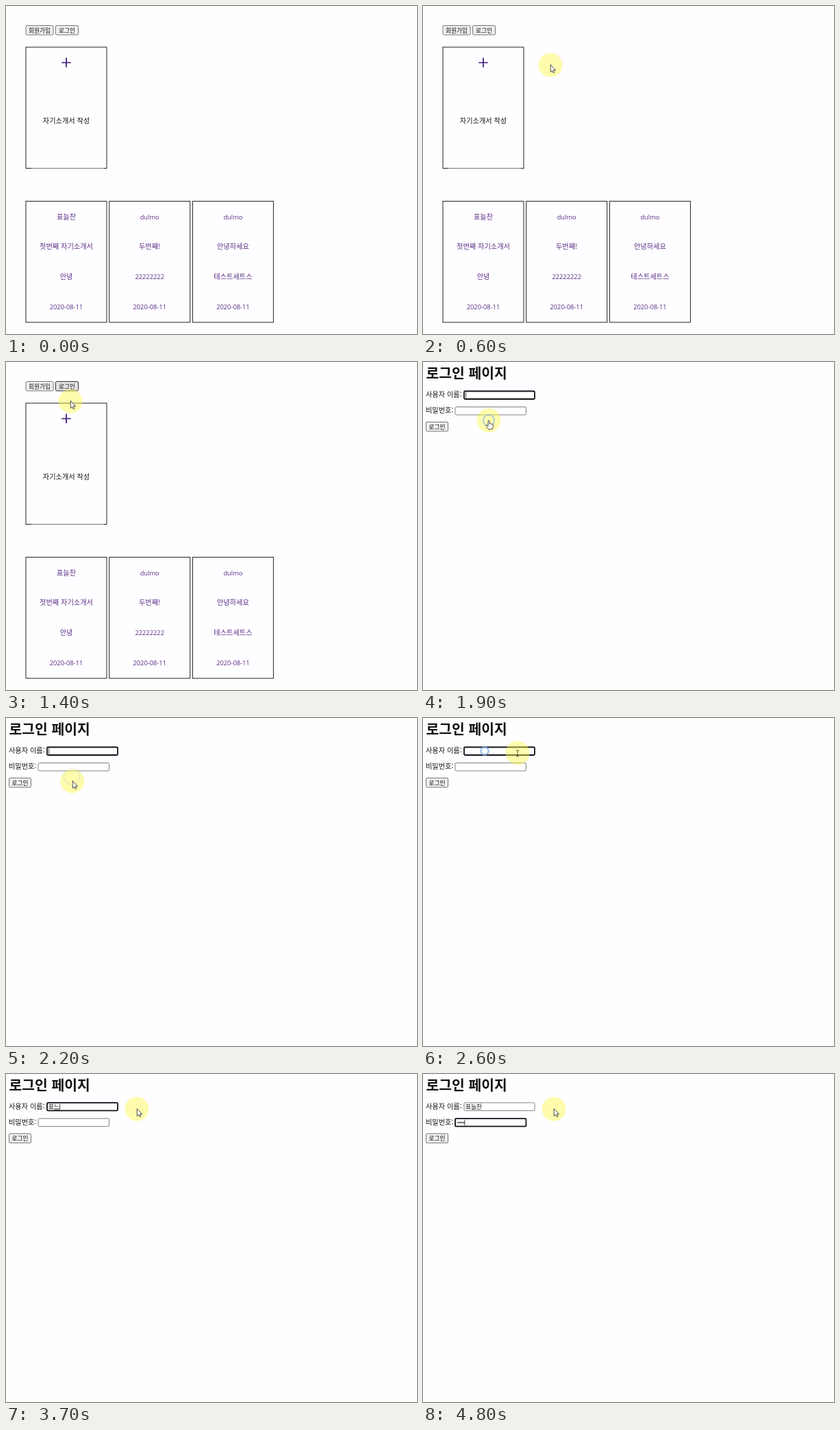
Recreate the animation shown at these times as an HTML page. Size 600 by 478 pixels, loop 5000 ms.

```html
<!DOCTYPE html>
<html lang="ko">
<meta charset="utf-8">
<title>로그인</title>
<style>
  html, body { margin: 0; width: 100%; height: 100%; overflow: hidden; background: #fefdff; }
  svg { display: block; }
  text { font: 10.2px "Noto Sans CJK KR", "Noto Sans CJK", sans-serif; fill: #111; }
  .mid { text-anchor: middle; }
  .link { fill: #5a2d85; }
  .latin { font: 9.3px "Open Sans", "Noto Sans", sans-serif; }
  .small { font-size: 8.7px; }
  h1, .title { font-size: 20.4px; font-weight: bold; }
  .card { fill: none; stroke: #222; }
  .button { fill: #efefef; stroke: #777; }
  .hover { fill: #e3e3e3; stroke: #333; }
  .field { fill: #fff; stroke: #808080; }
  .focus { stroke: #101018; stroke-width: 1.8; }
  .ink { stroke: #111; fill: none; }
</style>
<svg width="600" height="478" viewBox="0 0 600 478">
  <g id="home"></g>
  <g id="login">
    <text class="title" x="4.5" y="24">로그인 페이지</text>
    <g id="form">
      <text x="4" y="51.4">사용자 이름:</text>
      <text x="4" y="74.2">비밀번호:</text>
      <rect id="user" class="field" x="60" y="42.5" width="103" height="11.5" rx="1.5"/>
      <rect id="pass" class="field" x="47" y="65.5" width="103.5" height="11.5" rx="1.5"/>
      <text id="typed" class="small" x="62" y="51.6"></text>
      <path id="underline" class="ink" stroke-width=".8"/>
      <g id="dots"></g>
      <path id="caret" class="ink" stroke-width=".8"/>
    </g>
  </g>
  <g id="pointer">
    <circle r="17.5" fill="#fcf84a" opacity=".45"/>
  </g>
  <circle id="ring" fill="none" stroke="#82ade6" stroke-width="2.4"/>
  <g id="shapes" stroke="#222" stroke-width=".8" stroke-linejoin="round" fill="#fff">
    <path id="arrow" d="M.3-.5V10.3L2.7 8.1 4.2 11.5 5.8 10.8 4.4 7.6H7.5Z"/>
    <path id="hand" d="M-1 1Q0-1 1 1V5Q2.2 4 3 5.4 4.3 4.6 4.8 6 6.3 5.6 6.3 7.2V9.5L5 13H-.3L-3.8 8.2Q-4 6.5-2.5 7L-1 8.5Z"/>
    <path id="beam" fill="none" d="M-2-4Q0-4 0-3 0-4 2-4M0-3V4M-2 5Q0 5 0 4 0 5 2 5"/>
  </g>
</svg>
<script>
  const $ = id => document.getElementById(id);
  const show = (id, on) => $(id).style.display = on ? "" : "none";

  function add(parent, tag, attrs, label = "") {
    const el = document.createElementNS("http://www.w3.org/2000/svg", tag);
    for (const key in attrs) el.setAttribute(key, attrs[key]);
    el.textContent = label;
    return parent.appendChild(el);
  }

  function button(parent, x, y, width, label) {
    const box = add(parent, "rect", { class: "button", x, y, width, height: 13.5, rx: 1.5 });
    add(parent, "text", { class: "small mid", x: x + width / 2, y: y + 10.1 }, label);
    return box;
  }

  const card = (x, y) => add($("home"), "rect", { class: "card", x, y, width: 118, height: 176.5 });

  // Start page
  const home = $("home");
  button(home, 29, 28.5, 40, "회원가입");
  const loginButton = button(home, 72.5, 28.5, 33, "로그인");
  card(29, 60);
  add(home, "path", { d: "M37 236.5H143", stroke: "#777" });
  add(home, "path", { d: "M81.2 82.5H94.8M88 75.5V89.3", stroke: "#3a1878", "stroke-width": 1.7 });
  add(home, "text", { class: "mid", x: 88, y: 171.2 }, "자기소개서 작성");
  [
    ["표늘찬", "첫번째 자기소개서", "안녕"],
    ["dulmo", "두번째!", "22222222"],
    ["dulmo", "안녕하세요", "테스트세트스"]
  ].forEach((lines, i) => {
    card(29 + i * 121.7, 284.5);
    [...lines, "2020-08-11"].forEach((line, j) => {
      const latin = /^[\w-]+$/.test(line) ? " latin" : "";
      add(home, "text", { class: "mid link" + latin, x: 88 + i * 121.7, y: 310.5 + j * 43.9 }, line);
    });
  });

  // Login page
  button($("form"), 4.5, 87.5, 32, "로그인");
  const dots = [0, 1, 2, 3].map(i =>
    add($("dots"), "circle", { cx: 51.3 + i * 2.75, cy: 71.4, r: 1.05, fill: "#111" }));

  // Pointer positions, one per 100 ms from 400 ms on
  const track = [
    [276, 10], [232, 46], [186, 86], [146, 108], [117, 104], [105.5, 89],
    [104, 80], [99, 60], [95, 46], [93, 41], [94, 57], [95.5, 75],
    [96, 85], [96, 85], [96, 85], [96, 85], [96, 85], [96, 85],
    [97, 92], [95, 72], [91, 54], [90, 48], [138, 51], [191, 51]
  ];
  const clicks = [{ at: 16, x: 96, y: 85 }, { at: 25, x: 90, y: 48 }];
  const typing = ["ㅍ", "표", "푠", "표느", "표늘", "표늘ㅊ", "표늘차", "표늘찬"];

  function drawPointer(step) {
    show("pointer", step >= 4);
    show("shapes", step >= 4);
    const [x, y] = track[Math.max(0, Math.min(step - 4, track.length - 1))];
    for (const id of ["pointer", "shapes"]) $(id).setAttribute("transform", `translate(${x} ${y})`);
    const hand = step >= 15 && step <= 21, beam = step >= 23 && step <= 26;
    show("hand", hand);
    show("beam", beam);
    show("arrow", !hand && !beam);

    const click = clicks.find(c => step >= c.at && step < c.at + 7);
    show("ring", click);
    if (!click) return;
    const age = step - click.at, ring = $("ring");
    ring.setAttribute("cx", click.x);
    ring.setAttribute("cy", click.y);
    ring.setAttribute("r", 4.4 + 1.2 * age);
    ring.setAttribute("opacity", .9 * (1 - age / 7));
  }

  function drawForm(step) {
    const name = step < 34 ? "" : typing[Math.min(step - 34, typing.length - 1)];
    const inPass = step >= 43;
    const count = step < 46 ? 0 : [1, 3, 4][Math.min(step - 46, 2)];
    $("form").setAttribute("transform", `translate(0 ${step >= 34 ? -.6 : 0})`);
    $("typed").textContent = name;
    $("user").classList.toggle("focus", !inPass);
    $("pass").classList.toggle("focus", inPass);
    dots.forEach((dot, i) => dot.style.display = i < count ? "" : "none");

    const end = 62 + name.length * 8;
    show("underline", name && !inPass);
    $("underline").setAttribute("d", `M${end - 8} 52.8H${end}`);
    show("caret", step < 23 || step >= 28 && step < 32 || step >= 34);
    $("caret").setAttribute("d", inPass ? `M${49.8 + count * 2.75} 67.3V75.5` : `M${end + .6} 44.2V52.7`);
  }

  function frame(now) {
    const step = Math.floor(now % 5000 / 100);
    show("home", step < 18);
    show("login", step >= 18);
    loginButton.classList.toggle("hover", step >= 12 && step < 16);
    drawForm(step);
    drawPointer(step);
    requestAnimationFrame(frame);
  }
  frame(performance.now());
</script>
</html>
```
